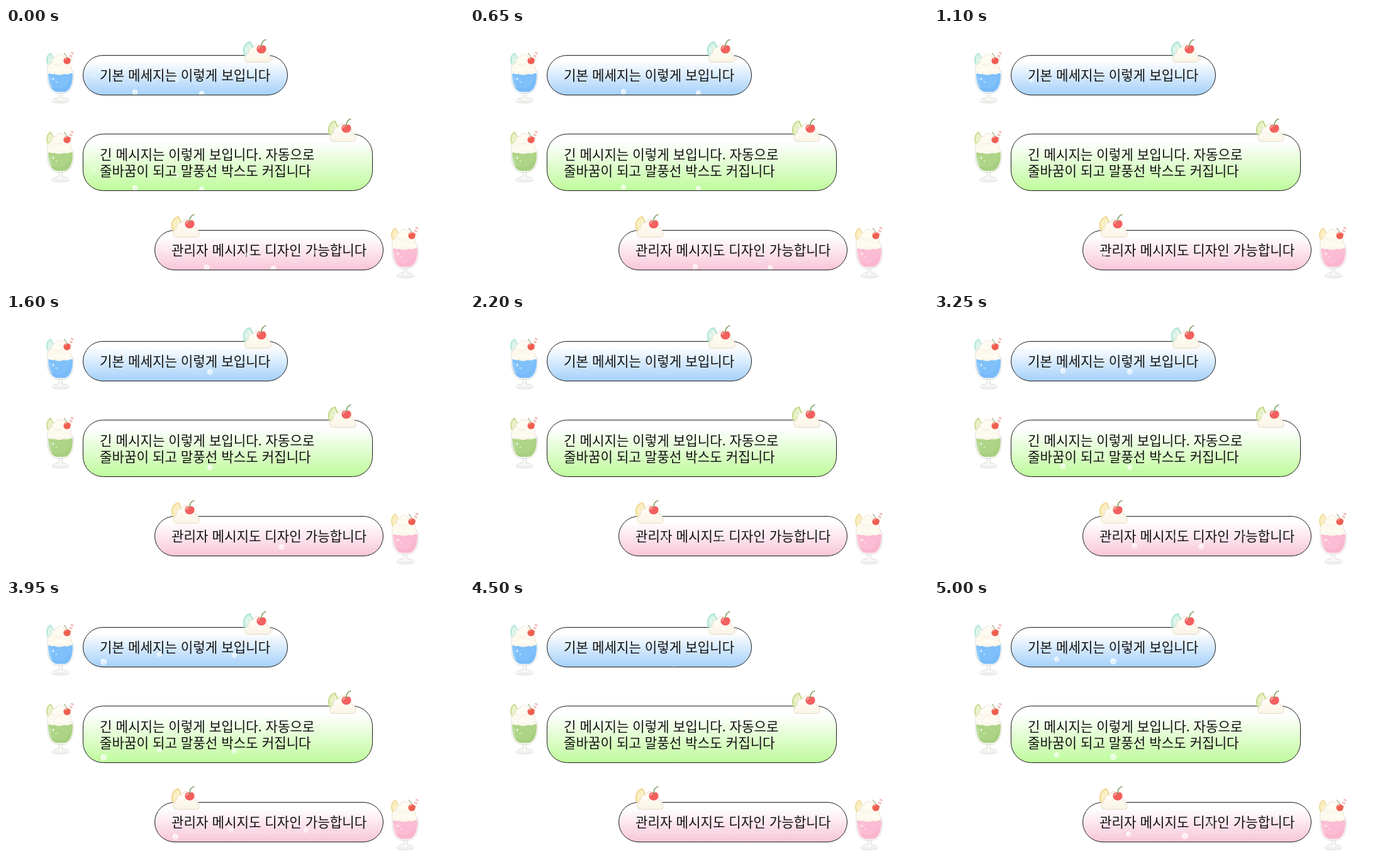
An HTML page that plays this animation: 728 by 410 pixels, repeating every 5.05 s.

```html
<!DOCTYPE html>
<html lang="ko">
<head>
<meta charset="utf-8">
<title>메시지 말풍선</title>
<style>
html, body { margin: 0; width: 100%; height: 100%; overflow: hidden; background: #fff; }
svg { display: block; width: 728px; height: 410px; }
text { font: 21.2px "Noto Sans CJK KR", "Noto Sans CJK", sans-serif; fill: #111; }
.edge { fill: none; stroke: #1c1c1c; stroke-width: 1; }
.blue { --box: url(#boxBlue); --drink: #7fc0fb; --deep: #74b7f7; --peel: #a9e3d4; --flesh: #d8f3e8; }
.green { --box: url(#boxGreen); --drink: #aed488; --deep: #a1cb79; --peel: #c5d98f; --flesh: #e6efbe; }
.pink { --box: url(#boxPink); --drink: #fbbcd4; --deep: #f9b1cc; --peel: #efd791; --flesh: #faedbd; }
</style>
</head>
<body>
<svg id="stage" viewBox="0 0 728 410">
  <defs>
    <linearGradient id="boxBlue" x2="0" y2="1"><stop offset=".14" stop-color="#fff"/><stop offset="1" stop-color="#a4d0fa"/></linearGradient>
    <linearGradient id="boxGreen" x2="0" y2="1"><stop offset=".14" stop-color="#fff"/><stop offset="1" stop-color="#befb9b"/></linearGradient>
    <linearGradient id="boxPink" x2="0" y2="1"><stop offset=".14" stop-color="#fff"/><stop offset="1" stop-color="#f8c6d9"/></linearGradient>
    <linearGradient id="cream" x2="0" y2="1"><stop offset=".4" stop-color="#fefbf2"/><stop offset="1" stop-color="#faf4e6"/></linearGradient>
    <radialGradient id="bead" cx=".55" cy=".6"><stop offset=".1" stop-color="#fff" stop-opacity=".45"/><stop offset=".75" stop-color="#fff" stop-opacity=".8"/><stop offset="1" stop-color="#fff" stop-opacity=".5"/></radialGradient>

    <g id="cup">
      <path d="M67 59C63 51 65 43 71 40L80 57Z" fill="var(--flesh)" stroke="var(--peel)" stroke-width="1.6" stroke-linejoin="round"/>
      <path d="M71 44L76 57M67.5 50L75 57" stroke="#fff" stroke-width=".8"/>
      <path d="M66 69C64 62 67 57 73 55C73 49 76 47 79 47C80 42 87 40 90 44C95 45 96 49 95 52C101 53 104 58 103 63C107 68 104 73 98 74H73C69 74 67 72 66 69Z" fill="url(#cream)" stroke="#e6decf" stroke-width=".8"/>
      <path d="M75 57C80 60 86 59 91 55" fill="none" stroke="#f2eadb" stroke-width="1"/>
      <path d="M99 56L105.5 39" stroke="#dccfca" stroke-width="4.6"/>
      <path d="M99 56L105.5 39" stroke="#fffaf7" stroke-width="3.6"/>
      <path d="M99 56L105.5 39" stroke="#f2968a" stroke-width="3.6" stroke-dasharray="1.6 3.6" stroke-dashoffset="-1"/>
      <circle cx="97" cy="52" r="5.6" fill="#ef5e50"/>
      <path d="M93.8 50q1-2.4 3.2-2.4" fill="none" stroke="#ffb3a6" stroke-width="1.2" stroke-linecap="round"/>
      <path d="M97 47C95.5 44 95 42 92 40" fill="none" stroke="#96a66e" stroke-width="1.1"/>
      <path d="M66 69C65 83 67 101 79 103.5H94C106 101 108 84 107 69Z" fill="#fbfbfa" stroke="#dddedb" stroke-width="1"/>
      <path d="M67.3 72H106C106.5 87 103 99 94 101.5H80C70 99 67 86 67.3 72Z" fill="var(--drink)"/>
      <path d="M104 78C104 90 101 98 93.5 101.5H80C75 100 72 97 70.5 92C80 100 98 96 104 78Z" fill="var(--deep)" opacity=".5"/>
      <path d="M66 68C68 73.5 73 74 77 73C82 75 88 75 92 73C98 75 104 73 104 67C96 62 75 62 66 68Z" fill="url(#cream)"/>
      <path d="M70 78C70 84 71 90 73 94" fill="none" stroke="#fff" stroke-width="1.4" stroke-linecap="round" opacity=".35"/>
      <circle cx="75" cy="81" r="1.9" fill="#fff" opacity=".6"/>
      <circle cx="80" cy="86" r="1.3" fill="#fff" opacity=".5"/>
      <path d="M83.5 103.5C84.5 106 85 109 83.5 111C76 112 73 114.5 73.5 116.5C75 120 98 120 100 116.5C100 114 97 112 90 111C88.5 109 89 106 90 103.5Z" fill="#f8f8f6" stroke="#d6d8d4" stroke-width="1"/>
      <path d="M78 115.5Q87 118 96 115.5" fill="none" stroke="#e2e4df"/>
    </g>

    <g id="topper">
      <path d="M380 44C375 34 379 24 388 22L397 42Z" fill="var(--flesh)" stroke="var(--peel)" stroke-width="2" stroke-linejoin="round"/>
      <path d="M387 26L391 40M381 32L390 40" stroke="#fff" stroke-width="1"/>
      <path d="M381 53C378 48 381 43 385 41C385 34 389 31 393 31C396 25 405 25 408 30C414 32 415 37 415 40C420 42 421 47 421 50C422 53 419 54.5 415 54.5H386C383 54.5 382 54 381 53Z" fill="url(#cream)" stroke="#e0d7c8" stroke-width=".9"/>
      <path d="M398.5 33.5C398.5 28 403 26.5 406 28.5C410 26 413.5 29 413.5 33C413.5 37.5 410.5 40.5 406 40.5C401.5 40.5 398.5 37.5 398.5 33.5Z" fill="#f3605f"/>
      <path d="M401 32.5Q401.5 30 403.5 30" fill="none" stroke="#ffc1ba" stroke-width="1.4" stroke-linecap="round"/>
      <path d="M406 29C406 23 408 20 413 18.5" fill="none" stroke="#7fa36b" stroke-width="1.7" stroke-linecap="round"/>
    </g>
  </defs>
</svg>
<script>
const LOOP = 5050, STEP = 50, CYCLE = 3100;
const FLOOR = 112, TRAVEL = 52, EASE = 450, FADE = 540;
const boxes = [
  { tone: "blue", x: 122.5, y: 43.5, w: 325, h: 63, r: 31.5, dx: 0, dy: 0, cup: [0, 0], top: [0, 0],
    lines: [[149, 83, "기본 메세지는 이렇게 보입니다"]] },
  { tone: "green", x: 122.5, y: 168.5, w: 460, h: 90, r: 32, dx: 0, dy: 152, cup: [0, 125.5], top: [135, 126],
    lines: [[149, 209, "긴 메시지는 이렇게 보입니다. 자동으로"], [149, 235, "줄바꿈이 되고 말풍선 박스도 커집니다"]] },
  { tone: "pink", x: 236.5, y: 321.5, w: 363, h: 63, r: 31.5, dx: 114, dy: 278, cup: [548, 278], top: [-114, 278],
    lines: [[263, 361, "관리자 메시지도 디자인 가능합니다"]], beadsInFront: true }
];
// x, height y at time ms, radius
const beads = [
  [205, 102, 0, 4.6], [311, 104, 0, 4.6],
  [244, 101, 650, 4.4], [363, 103, 650, 4.4],
  [155, 98, 3950, 5.2], [324, 92, 1600, 4.8],
  [195, 94, 5000, 4.3], [285, 97, 5000, 5.3],
  [139, 88, 2800, 4.7], [271, 103, 2800, 4.7], [375, 95, 2800, 4.7]
];

function add(parent, tag, attrs, text) {
  const el = document.createElementNS("http://www.w3.org/2000/svg", tag);
  for (const key in attrs) el.setAttribute(key, attrs[key]);
  if (text) el.textContent = text;
  return parent.appendChild(el);
}

const stage = document.getElementById("stage");
const layers = boxes.map(b => {
  const shape = { x: b.x, y: b.y, width: b.w, height: b.h, rx: b.r };
  const group = add(stage, "g", { class: b.tone });
  add(add(group, "clipPath", { id: "clip-" + b.tone }), "rect", shape);
  add(group, "rect", { ...shape, style: "fill:var(--box)" });
  const clipped = add(group, "g", { "clip-path": `url(#clip-${b.tone})` });
  const layer = add(clipped, "g", { transform: `translate(${b.dx} ${b.dy})` });
  for (const [x, y, words] of b.lines) add(group, "text", { x, y }, words);
  if (b.beadsInFront) group.append(clipped);
  add(group, "rect", { ...shape, class: "edge" });
  add(group, "use", { href: "#topper", transform: `translate(${b.top})` });
  add(group, "use", { href: "#cup", transform: `translate(${b.cup})` });
  return beads.map(([cx]) => {
    const dot = add(layer, "g", {});
    add(dot, "circle", { r: 1, fill: "url(#bead)" });
    add(dot, "circle", { cx: -.3, cy: -.35, r: .28, fill: "#fff" });
    return dot;
  });
});

// Beads shoot up, slow down, shrink and fade.
function draw(time) {
  beads.forEach(([x, y0, t0, radius], i) => {
    const start = t0 + EASE * Math.log(1 - (FLOOR - y0) / TRAVEL);
    const age = ((time - start) % CYCLE + CYCLE) % CYCLE;
    const y = FLOOR - TRAVEL * (1 - Math.exp(-age / EASE));
    const alpha = 1 / (1 + (age / FADE) ** 4);
    const size = radius * (1 - .35 * Math.min(1, Math.max(0, age - 200) / 500));
    for (const dots of layers) {
      dots[i].setAttribute("transform", `translate(${x} ${y}) scale(${size})`);
      dots[i].setAttribute("opacity", alpha);
    }
  });
}

const begin = performance.now();
function tick() {
  const time = (performance.now() - begin) % LOOP;
  draw(Math.floor(time / STEP) * STEP);
  requestAnimationFrame(tick);
}
tick();
</script>
</body>
</html>
```
